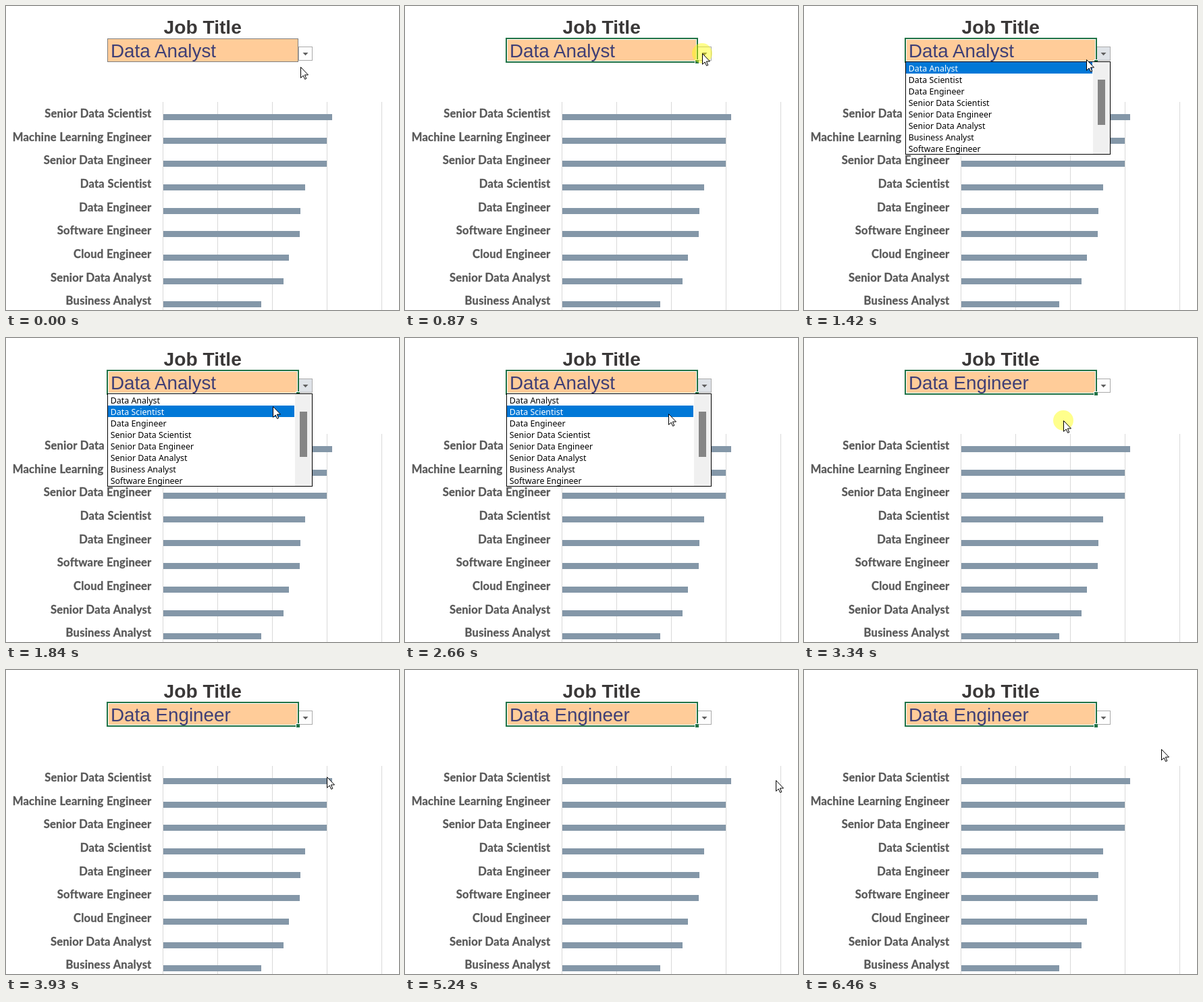
Animation, 582 px wide and 450 px high, one loop 8 s. Source, as an HTML page:

```html
<!DOCTYPE html>
<html lang="en">
<head>
<meta charset="utf-8">
<title>Job Title picker</title>
<style>
  html, body { margin: 0; width: 100%; height: 100%; overflow: hidden; background: #fff; }
  svg { display: block; width: 582px; height: 450px; }
  rect { shape-rendering: crispEdges; }
  .title { font: bold 28.2px "Liberation Sans", Arial, sans-serif; fill: #3a3838; }
  .value { font: 27.8px "Liberation Sans", Arial, sans-serif; fill: #3f3f76; }
  .label { font: bold 16.6px Lato, Carlito, sans-serif; letter-spacing: .2px; word-spacing: .3px;
           fill: #595959; stroke: #595959; stroke-width: .35px; text-anchor: end; }
  .item { font: 12.4px "Noto Sans", Tahoma, sans-serif; }
</style>
</head>
<body>
<svg id="stage" viewBox="0 0 582 450"></svg>
<script>
const LOOP = 8000, ROW = 17, LIST_TOP = 83;
const NS = 'http://www.w3.org/2000/svg';
const stage = document.getElementById('stage');

function add(parent, tag, attrs, text) {
  const el = document.createElementNS(NS, tag);
  for (const key in attrs) el.setAttribute(key, attrs[key]);
  if (text) el.textContent = text;
  return parent.appendChild(el);
}
const box = (parent, x, y, width, height, fill) =>
  add(parent, 'rect', { x, y, width, height, fill });
const write = (parent, cls, x, y, text) =>
  add(parent, 'text', { class: cls, x, y }, text);
const group = () => add(stage, 'g', {});
const show = (el, on) => el.setAttribute('visibility', on ? 'visible' : 'hidden');

// Chart: label and right end of each bar
const bars = [
  ['Senior Data Scientist', 483], ['Machine Learning Engineer', 475],
  ['Senior Data Engineer', 475], ['Data Scientist', 443],
  ['Data Engineer', 436], ['Software Engineer', 435],
  ['Cloud Engineer', 419], ['Senior Data Analyst', 411],
  ['Business Analyst', 378]
];
const chart = group();
for (let i = 0; i < 5; i++) box(chart, 232 + 81 * i, 142, 1, 308, '#d9d9d9');
bars.forEach(([name, end], i) => {
  box(chart, 233, Math.round(160 + 34.65 * i), end - 233, 9, '#8497a8');
  write(chart, 'label', 215.5, Math.round(165 + 34.65 * i), name);
});

// Input cell
const cell = group();
write(cell, 'title', 233.5, 41, 'Job Title');
box(cell, 150, 48, 283, 35, '#7f7f7f');
box(cell, 151, 49, 281, 33, '#ffcc99');

const button = group();
box(button, 433, 60, 21, 21, '#ababab');
const face = box(button, 434, 61, 19, 19, '#fdfdfd');
add(button, 'path', { d: 'M439.5 69h8l-4 4.2z', fill: '#606060' });

const frame = group();
box(frame, 149, 47, 285, 37, '#217346');
box(frame, 151, 49, 281, 33, '#fff');
box(frame, 152, 50, 279, 31, '#ffcc99');
box(frame, 429, 79, 6, 6, '#fff');
box(frame, 430, 80, 5, 5, '#217346');

const value = write(stage, 'value', 155, 76, 'Data Analyst');

// Drop-down list
const list = group();
box(list, 150, 82, 304, 138, '#000');
box(list, 151, 83, 277, 136, '#fff');
box(list, 428, 83, 25, 136, '#f0f0f0');
box(list, 435, 109, 11, 67, '#858585');
const mark = box(list, 151, LIST_TOP, 276, ROW, '#0078d7');
const items = ['Data Analyst', 'Data Scientist', 'Data Engineer', 'Senior Data Scientist',
  'Senior Data Engineer', 'Senior Data Analyst', 'Business Analyst', 'Software Engineer']
  .map((name, i) => write(list, 'item', 154.8, 97 + ROW * i, name));

// Pointer
const halo = add(stage, 'circle', { r: 15, fill: '#ff0', 'fill-opacity': .45 });
const pointer = add(stage, 'path', {
  d: 'M.5.5V16.4L4.2 13 6.6 18.4 8.8 17.5 6.4 12H11.5Z',
  fill: '#fff', stroke: '#000', 'stroke-width': 1
});

// Each move is a list of [time, x, y]; the pointer rests between moves
const moves = [
  [[0, 436, 90], [70, 439, 78], [140, 440, 70]],
  [[1210, 437, 71], [1420, 418, 79], [1840, 395, 101], [1910, 395, 103]],
  [[2390, 395, 104], [2930, 386, 119], [3070, 384, 122]],
  [[3660, 396, 127], [3930, 474, 158], [4280, 546, 169]],
  [[5240, 549, 163], [5380, 556, 143]],
  [[5600, 556, 142]],
  [[5800, 550, 136], [5930, 529, 117]]
];
const clicks = [[340, 480], [870, 1010], [3270, 3410], [6330, 6460]];
const SELECT = 410, OPEN = 940, CLOSE = 3340;

function pointerAt(t) {
  const move = moves.filter(m => m[0][0] <= t).pop();
  const start = move[0][0], last = move[move.length - 1];
  if (t >= last[0]) return last.slice(1);
  // The pointer advances about every 70 ms
  const span = last[0] - start;
  const step = span / Math.round(span / 70);
  const s = start + Math.floor((t - start) / step + .1) * step;
  const i = Math.max(1, move.findIndex(k => k[0] >= s));
  const [a, b] = [move[i - 1], move[i]];
  const p = (s - a[0]) / (b[0] - a[0]);
  return [1, 2].map(n => Math.round(a[n] + (b[n] - a[n]) * p));
}

function draw(t) {
  const [x, y] = pointerAt(t);
  const open = t >= OPEN && t < CLOSE;
  const row = Math.max(0, Math.floor((y - LIST_TOP) / ROW));

  show(frame, t >= SELECT);
  show(list, open);
  face.setAttribute('fill', open ? '#dfe3e8' : '#fdfdfd');
  value.textContent = t < CLOSE ? 'Data Analyst' : 'Data Engineer';
  mark.setAttribute('y', LIST_TOP + ROW * row);
  items.forEach((el, i) => el.setAttribute('fill', i === row ? '#fff' : '#000'));

  pointer.setAttribute('transform', `translate(${x} ${y})`);
  halo.setAttribute('cx', x);
  halo.setAttribute('cy', y);
  show(halo, clicks.some(([from, to]) => t >= from && t < to));
}

const begin = performance.now();
function tick() {
  draw((performance.now() - begin) % LOOP);
  requestAnimationFrame(tick);
}
tick();
</script>
</body>
</html>
```
